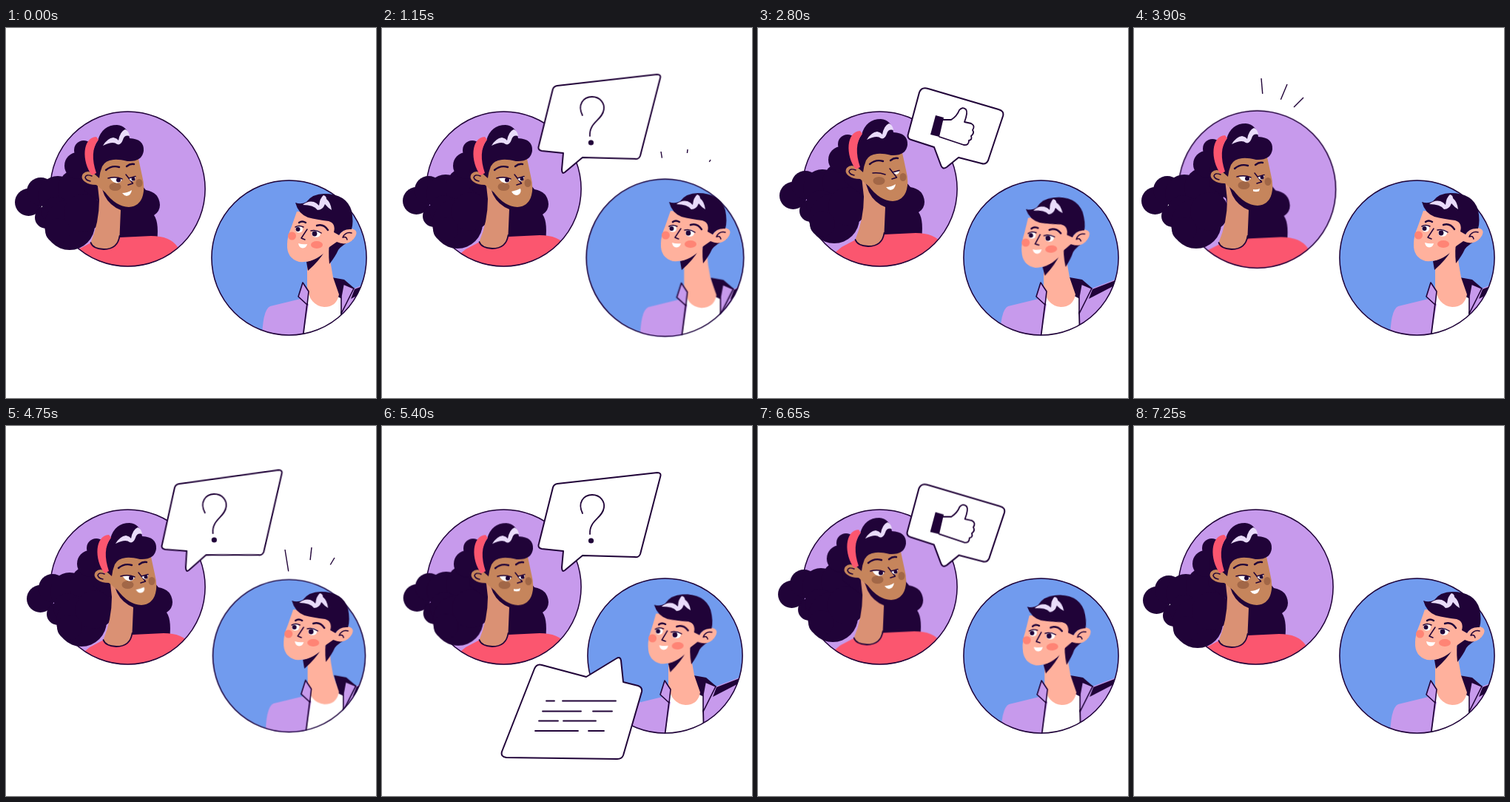
An HTML page that plays this animation: 500 by 500 pixels, repeating every 7.3 s.

```html
<!DOCTYPE html>
<html lang="en">
<head>
<meta charset="utf-8">
<title>Two people chatting</title>
<style>
html, body { margin: 0; width: 100%; height: 100%; overflow: hidden; background: #fff; }
svg { display: block; width: 100vw; height: 100vh; }

.ink { fill: #200338; }
.line { fill: none; stroke: #200338; stroke-width: 1.8; stroke-linecap: round; stroke-linejoin: round; }
.thin { stroke-width: 1.5; }
.brow { stroke-width: 2.4; }
.lilac { fill: #c79aec; }
.blue { fill: #719bee; }
.red { fill: #fb566f; }
.brown { fill: #c6855c; }
.tan { fill: #da9174; }
.mole { fill: #a26747; }
.peach { fill: #ffb19d; }
.pink { fill: #ff8475; }
.white { fill: #fff; }
.shine { fill: #e9dcfa; }
.edge { stroke: #200338; stroke-width: 1.6; stroke-linejoin: round; }
.bubble { fill: #fff; stroke: #200338; stroke-width: 2; stroke-linejoin: round; }

/* every part shares one 3.65 s conversation */
.a { animation: 3.65s ease-in-out infinite; }
.cut { animation: 3.65s step-end infinite; }

.w-head { animation-name: wHead; }
.w-body { animation-name: wBody; }
.w-pony { animation-name: wPony; }
.m-head { animation-name: mHead; transform-origin: 460px 282px; }
.m-neck { animation-name: mNeck; }
.m-body { animation-name: mBody; }
.w-disc { animation-name: wDisc; transform-origin: 164.5px 217.5px; }
.m-disc { animation-name: mDisc; transform-origin: 382.5px 310.5px; }
.ask { animation-name: ask; transform-origin: 244px 196px; }
.reply { animation-name: reply; transform-origin: 321px 313px; }
.like { animation-name: like; transform-origin: 250px 189px; }
.rays path { fill: none; stroke: #200338; stroke-width: 1.4; stroke-dasharray: 1 3; stroke-dashoffset: 1.1; }
.w-ray { animation-name: wRay; }
.m-ray { animation-name: mRay; }
.smile { animation-name: smile; }
.flat { animation-name: flat; }
.talk { animation-name: talk; }
.say { animation-name: say; transform-origin: 164px 222px; }
.w-open { animation-name: wOpen; }
.w-shut { animation-name: wShut; }
.m-open { animation-name: mOpen; }
.m-shut { animation-name: mShut; }

@keyframes wHead {
  0%, 100% { transform: translate(0, 0); }
  6.85%, 10% { transform: translate(1px, -2px); }
  20.5% { transform: translate(18px, 0); }
  24%, 43.8% { transform: translate(17px, 0); }
  56%, 67.5% { transform: translate(21px, 1px); }
  74%, 80.5% { transform: translate(16px, -8px); }
  87.5% { transform: translate(-1px, 1px); }
  92% { transform: translate(0, 0); }
}
@keyframes wBody {
  0%, 10%, 88%, 100% { transform: translate(0, 0); }
  20.5%, 67.5% { transform: translate(17px, -1px); }
  74%, 80.5% { transform: translate(17px, -4px); }
}
@keyframes wPony {
  0%, 100% { transform: translate(0, 0); }
  6.85%, 10% { transform: translate(-2px, -2px); }
  22%, 43.8% { transform: translate(16px, -2px); }
  56%, 67.5% { transform: translate(19px, -7px); }
  74%, 80.5% { transform: translate(17px, -9px); }
  88% { transform: translate(-1px, 0); }
  94% { transform: translate(0, 0); }
}
@keyframes mHead {
  0%, 100% { transform: translate(0, 0) rotate(0); }
  6.85% { transform: translate(-2px, -1px) rotate(0); }
  24% { transform: translate(-1px, 0) rotate(0); }
  29.6% { transform: translate(-5px, 0) rotate(0); }
  32% { transform: translate(-3px, -1px) rotate(0); }
  34.5% { transform: translate(-2px, 0) rotate(0); }
  42%, 67.1% { transform: translate(-21px, 2px) rotate(-3deg); }
  74%, 81% { transform: translate(-25px, 2px) rotate(-5.5deg); }
  88%, 95% { transform: translate(0, 0) rotate(0); }
}
@keyframes mNeck {
  0%, 24%, 88%, 100% { transform: translate(0, 0); }
  30% { transform: translate(1px, 0); }
  34.5% { transform: translate(0, 0); }
  42%, 67.1% { transform: translate(-20px, 0); }
  74%, 81% { transform: translate(-21px, 0); }
}
@keyframes mBody {
  0%, 24%, 88%, 100% { transform: translate(0, 0); }
  30% { transform: translate(4px, 0); }
  34.5% { transform: translate(0, 0); }
  42%, 81% { transform: translate(-19px, 0); }
}
@keyframes wDisc {
  0%, 1.4%, 11%, 100% { transform: scale(1); }
  4% { transform: scale(.983); }
  6.4% { transform: translate(2px, .5px) scale(1.016); }
}
@keyframes mDisc {
  0%, 27%, 35%, 100% { transform: scale(1); }
  29.9% { transform: scale(.983); }
  31.8% { transform: scale(1.018); }
}
@keyframes wRay {
  0%, 2.7% { stroke-dashoffset: 1.1; }
  6.2% { stroke-dashoffset: 0; }
  9%, 100% { stroke-dashoffset: -1.1; }
}
@keyframes mRay {
  0%, 26.5% { stroke-dashoffset: 1.1; }
  29.7% { stroke-dashoffset: 0; }
  32.8%, 100% { stroke-dashoffset: -1.1; }
}
@keyframes ask {
  0%, 17.8% { transform: scale(0) rotate(-15deg); }
  23.8% { transform: scale(1.03) rotate(2deg); }
  29.6% { transform: scale(1) rotate(-1.8deg); }
  32%, 50.7% { transform: scale(1) rotate(0); }
  53.4% { transform: scale(1.13) rotate(-2deg); }
  57%, 100% { transform: scale(0) rotate(0); }
}
@keyframes reply {
  0%, 35.6% { transform: scale(0) rotate(12deg); }
  41.6% { transform: scale(.98) rotate(-1deg); }
  44%, 68% { transform: scale(1) rotate(0); }
  70.4% { transform: scale(1.06) rotate(0); }
  74%, 100% { transform: scale(0) rotate(0); }
}
@keyframes like {
  0%, 61.6% { transform: scale(0) rotate(-12deg); }
  67.1% { transform: scale(.91) rotate(-2deg); }
  71.2% { transform: scale(1.09) rotate(1deg); }
  75.3%, 80.8% { transform: scale(1) rotate(0); }
  83% { transform: scale(1.03) rotate(0); }
  85.5%, 100% { transform: scale(0) rotate(0); }
}
@keyframes smile { 0% { opacity: 1; } 4.1% { opacity: 0; } 71.2%, 100% { opacity: 1; } }
@keyframes flat { 0% { opacity: 0; } 4.1% { opacity: 1; } 16.4% { opacity: 0; } 43.8% { opacity: 1; } 71.2%, 100% { opacity: 0; } }
@keyframes talk { 0% { opacity: 0; } 16.4% { opacity: 1; } 43.8%, 100% { opacity: 0; } }
@keyframes say {
  0%, 16.4% { transform: scale(.8, .6); }
  20.5%, 26%, 31.5%, 37% { transform: scale(1); }
  23.3%, 29%, 34.2%, 40%, 100% { transform: scale(.85, .75); }
}
@keyframes wOpen { 0% { opacity: 1; } 75.4% { opacity: 0; } 79.5%, 100% { opacity: 1; } }
@keyframes wShut { 0% { opacity: 0; } 75.4% { opacity: 1; } 79.5%, 100% { opacity: 0; } }
@keyframes mOpen { 0% { opacity: 1; } 65% { opacity: 0; } 69.8%, 100% { opacity: 1; } }
@keyframes mShut { 0% { opacity: 0; } 65% { opacity: 1; } 69.8%, 100% { opacity: 0; } }
</style>
</head>
<body>
<svg viewBox="0 0 500 500">
  <defs>
    <clipPath id="wClip"><circle cx="164.5" cy="217.5" r="105"/></clipPath>
    <clipPath id="mClip"><circle cx="382.5" cy="310.5" r="105"/></clipPath>
  </defs>

  <!-- woman -->
  <g class="a w-disc">
    <circle class="lilac" cx="164.5" cy="217.5" r="105"/>
    <g clip-path="url(#wClip)" class="ink">
      <g class="a w-body">
        <path d="M120 200 L178 206 L189 219 Q207 222 208 239 Q208 248 200 253 Q208 264 203 296 L130 296Z"/>
        <path class="red" d="M60 330 L96 300 L115 290 L154 283 L196 281 Q222 281 232 296 L250 330Z"/>
      </g>
    </g>
    <circle class="line thin" cx="164.5" cy="217.5" r="104.6"/>
  </g>
  <g class="ink a w-pony">
    <circle cx="30.5" cy="235.5" r="18.5"/>
    <circle cx="47" cy="221" r="19"/>
    <circle cx="70" cy="226" r="26"/>
    <circle cx="98" cy="218" r="28"/>
    <circle cx="54" cy="256" r="15"/>
    <circle cx="68" cy="248" r="20"/>
    <circle cx="86" cy="266" r="34"/>
    <circle cx="104" cy="250" r="26"/>
    <circle cx="70" cy="274" r="17"/>
  </g>
  <g class="ink a w-head">
    <circle cx="105" cy="165" r="13"/>
    <circle cx="97" cy="186" r="18"/>
    <path d="M104 165 L128 170 L150 240 L128 236 L100 215Z"/>
  </g>
  <g class="a w-body">
    <path class="tan" d="M122 196 L133 226 Q140 240 155 246 L153.500 281 Q151 299 132 299 Q117 298 114.500 290 Q126 262 126 232Z"/>
    <path class="line" d="M114.500 290 Q117 298 132 299 Q151 299 153.500 281"/>
  </g>
  <g class="a w-head">
    <path class="brown" d="M126 175 L178 172 Q181 186 184 200 Q188 215 185 226 Q181 241 166 242 Q148 241 134 222 L122 212 Q112 212 107 208 Q100 203 104 197 Q110 191 119 197Z"/>
    <path class="line thin" d="M116 200 Q108 197 107 202 Q108 206 114 207"/>
    <path class="ink" d="M118 196 Q112 170 124 152 Q130 131 150 131 Q164 132 167 149 Q187 150 186 166 Q184 181 164 180 Q152 177 145 178 Q134 179 130 187 Q127 194 126 203Z"/>
    <path class="red" d="M122 147 C103 148 102 180 116 199 L122 196 C116 178 116 162 125 151Z"/>
    <path class="shine" d="M131 159 Q137 149 145 148 Q150 149 152 152 Q154 140 161 137 Q166 139 167 146 Q160 144 158 151 Q155 159 150 157 Q145 152 131 159Z"/>
    <path class="line brow" d="M135 192 Q143 185 153 188 M163 187 Q168 183 173 184"/>
    <ellipse class="mole" cx="147.5" cy="214.5" rx="8" ry="5.5"/>
    <ellipse class="mole" cx="180" cy="209.5" rx="4.5" ry="5.5"/>
    <path class="line thin" d="M162 198 L171.500 210 L165 212"/>
    <g class="cut w-open">
      <path class="white" d="M141 203 Q149 201 157 204 Q155 210 149 209.500 Q143 208 141 203Z M166 203 L175 201 Q175 207 171 207 Q168 207 166 203Z"/>
      <circle class="ink" cx="152" cy="205.5" r="3"/>
      <circle class="ink" cx="172" cy="204" r="2.500"/>
      <path class="line thin" d="M138 203 Q148 200 157 204 M166 203 L175 200.500"/>
    </g>
    <g class="cut w-shut">
      <path class="white" d="M166 203 L175 201 Q175 205 171 206Z"/>
      <path class="line thin" d="M139 204 Q148 203 156 206 M166 203 L175 200.500"/>
    </g>
    <path class="white cut smile" d="M157 223 Q164 223 170 219 Q169 226 163 227 Q159 226 157 223Z"/>
    <path class="white cut flat" d="M160 220 Q165 221 169 219 L168 222.500 Q164 224 160 222.500Z"/>
    <g class="cut talk"><path class="white a say" d="M158 221 Q164 220 170 217 Q172 222 168 225 Q162 228 158 221Z"/></g>
  </g>
  <g class="rays">
    <path class="a w-ray" pathLength="1" d="M174 92 L172 68"/>
    <path class="a w-ray" pathLength="1" d="M197 100 L207 76"/>
    <path class="a w-ray" pathLength="1" d="M214 109 L229 94"/>
  </g>

  <!-- man -->
  <g class="a m-disc">
    <circle class="blue" cx="382.5" cy="310.5" r="105"/>
    <g clip-path="url(#mClip)">
      <g class="a m-body">
        <path class="white" d="M408 352 L399 420 L456 420 L453 350Z"/>
        <path class="lilac" d="M346 425 Q346 381 357 376 L398 366 L409 373 L400 425Z"/>
        <path class="lilac" d="M453 386 L470 352 L520 333 L520 425 L453 425Z"/>
        <path class="ink" d="M466 366 L471 353 L520 334 L520 338Z"/>
        <path class="line" d="M407 372 L401 420 M453 384 L454 420"/>
        <path class="ink" d="M440 337 L457 340 L471 352 L454 366 L446 362Z"/>
      </g>
      <g class="a m-neck">
        <path class="peach" d="M407 310 L436 294 L439 320 L442 337 L450 360 Q447 377 430 377 Q410 375 407 350Z"/>
      </g>
      <g class="a m-body edge">
        <path class="lilac" d="M401 344 L395 363 L407 374 L409 356Z"/>
        <path class="lilac" d="M456 346 L470 352 L453 386 L453 362Z"/>
      </g>
    </g>
    <circle class="line thin" cx="382.5" cy="310.5" r="104.6"/>
  </g>
  <g class="a m-head">
    <path class="ink" d="M438 284 L469 286 Q454 293 449 300 Q445 309 437 319 Q435 302 438 284Z"/>
    <path class="ink" d="M406 316 Q420 313 431 301 Q424 314 408 328Z"/>
    <path class="peach" d="M393 248 L386 268 Q380 282 380 292 Q379 311 396 316 Q420 318 437 296 L447 289 Q460 295 469 286 Q479 274 467 271 Q456 271 450 280 L445 252Z"/>
    <path class="ink" d="M391 236 Q399 239 406 235 Q414 224 430 224 Q460 224 467 247 Q470 262 467 272 Q455 271 450 280 L443 276 Q446 264 436 261 Q420 259 408 256 Q395 251 391 236Z"/>
    <path class="shine" d="M401 239 Q408 233 416 235 Q421 237 423 240 Q424 230 429 226 Q433 227 433 231 Q439 236 440 246 Q435 243 431 238 Q428 246 421 246 Q416 239 401 239Z"/>
    <path class="line thin" d="M467 277 Q459 275 455 283 M455 283 Q460 281 461 286"/>
    <path class="line brow" d="M396 263 Q400 260 405 263 M420 267 Q429 264 435 273"/>
    <ellipse class="pink" cx="386.5" cy="281" rx="5.5" ry="5.5"/>
    <ellipse class="pink" cx="420" cy="293" rx="8" ry="5"/>
    <path class="line thin" d="M407 272 L399 284 L404 286"/>
    <ellipse class="white" cx="396" cy="272" rx="5" ry="4.500"/>
    <circle class="ink" cx="394.500" cy="272" r="3"/>
    <path class="line thin" d="M391 269 Q396 266 402 269"/>
    <g class="cut m-open">
      <ellipse class="white" cx="419" cy="278" rx="6" ry="4.800"/>
      <circle class="ink" cx="417" cy="278" r="3.400"/>
      <path class="line thin" d="M412 274 Q419 272 426 277"/>
    </g>
    <path class="line thin cut m-shut" d="M412 275 Q420 276 427 279"/>
    <path class="white" d="M395 291 Q401 293 407 292 Q406 297 401 297.500 Q396 297 395 291Z"/>
  </g>
  <g class="rays">
    <path class="a m-ray" pathLength="1" d="M382 198 L377 167"/>
    <path class="a m-ray" pathLength="1" d="M411 182 L413 164"/>
    <path class="a m-ray" pathLength="1" d="M438 188 L444 178"/>
  </g>

  <!-- messages -->
  <g class="a ask">
    <path class="bubble" d="M237 78 L372 63 Q378 63 376 69 L349 173 Q347 178 342 177 L271 175 L247 195 Q243 198 243 191 L245 169 L216 166 Q210 165 212 159 L231 83 Q232 79 237 78Z"/>
    <path class="line" d="M271 118 C264 104 272 93 284 93 C296 93 301 103 300 110 C298 125 280 127 281 146"/>
    <circle class="ink" cx="282.5" cy="155" r="3.6"/>
  </g>
  <g class="a reply">
    <path class="bubble" d="M216 323 L276 339 L317 314 Q322 311 323 317 L326 346 L346 351 Q352 353 351 359 L326 445 Q324 450 318 450 L168 448 Q160 447 162 440 L206 328 Q209 321 216 323Z"/>
    <path class="line" d="M222 371.500 H233 M244 371.500 H316 M217 385.500 H269 M285 385.500 H311 M212 398.500 H238 M245 398.500 H289 M207 412 H265 M279 412 H300"/>
  </g>
  <g class="a like">
    <path class="bubble" d="M230 82 L325 110 Q333 112 331 119 L311 179 Q308 185 302 183 L271 175 L255 188 Q249 192 247 185 L238 161 L207 151 Q201 149 203 143 L218 87 Q221 79 230 82Z"/>
    <path class="ink" d="M240 118 L251 121 L245 147 L233 144Z"/>
    <path class="line" d="M250 124 L261 124 Q269 119 272 111 Q276 106 281 110 Q284 114 279 127 L288 129 Q294 132 290 138 Q293 142 288 146 Q290 151 285 152 Q285 159 278 158 L245 147"/>
  </g>
</svg>
</body>
</html>
```
